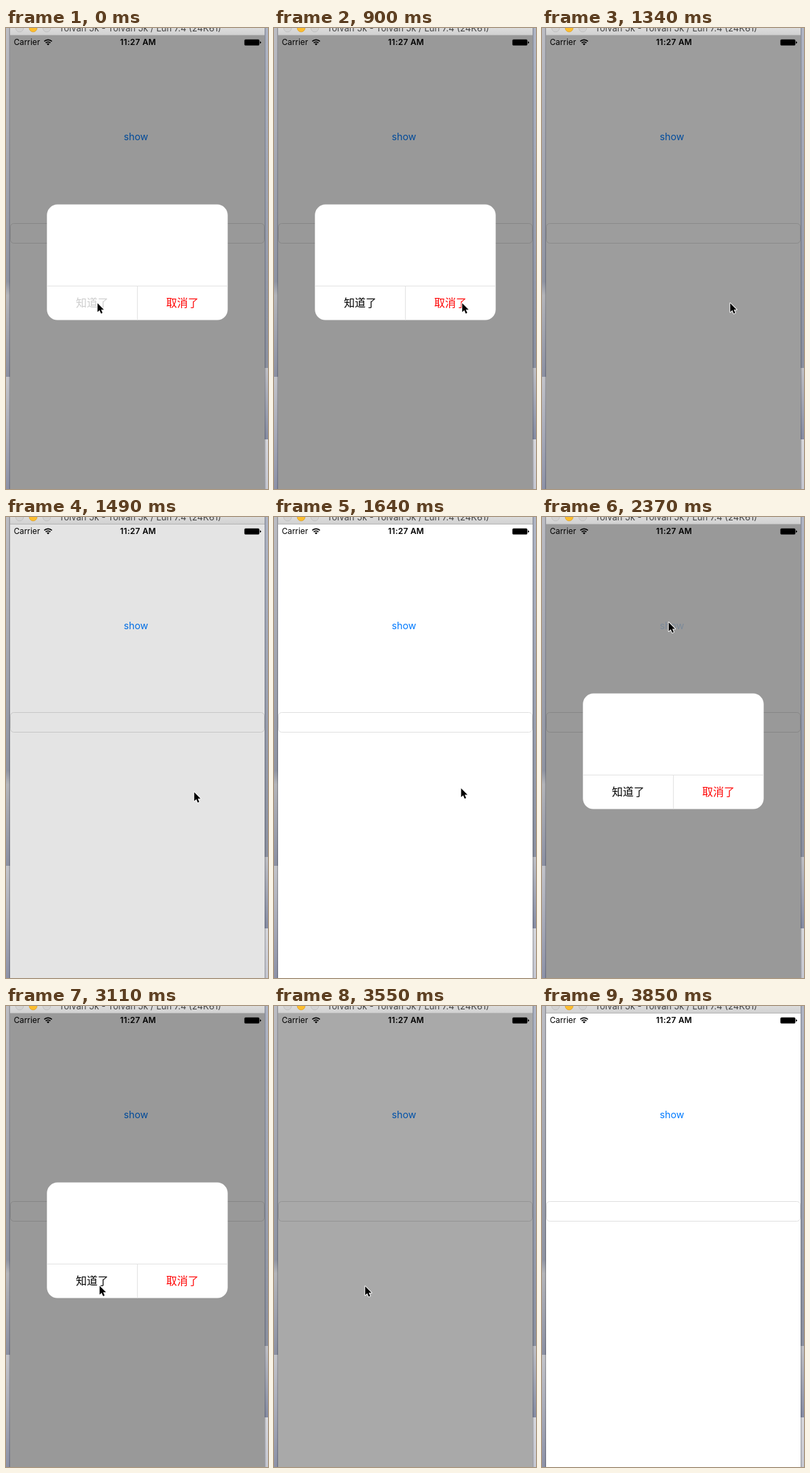
Recreate the animation shown at these times as an HTML page. Size 386x678 px, loop 4.66 s.

```html
<!DOCTYPE html>
<html lang="zh-CN">
<head>
<meta charset="utf-8">
<title>Alert demo</title>
<style>
  html, body { margin: 0; width: 100%; height: 100%; overflow: hidden; }
  svg { display: block; width: 386px; height: 678px; font-family: Inter, Roboto, sans-serif; }
  .cjk { font: 16px "Noto Sans CJK SC", "Noto Sans CJK", sans-serif; text-anchor: middle; }
  .mid { text-anchor: middle; }
</style>
</head>
<body>
<svg viewBox="0 0 386 678">
  <defs>
    <linearGradient id="left" gradientUnits="userSpaceOnUse" x1="0" y1="0" x2="0" y2="678">
      <stop offset="0" stop-color="#bcbdc4"/>
      <stop offset=".55" stop-color="#8f94a3"/>
      <stop offset=".58" stop-color="#b4b5ba"/>
      <stop offset=".757" stop-color="#8b90a3"/>
      <stop offset=".757" stop-color="#c3c4ca"/>
      <stop offset="1" stop-color="#8d92a8"/>
    </linearGradient>
    <linearGradient id="right" gradientUnits="userSpaceOnUse" x1="0" y1="0" x2="0" y2="678">
      <stop offset="0" stop-color="#b0b6c6"/>
      <stop offset=".738" stop-color="#8a90a0"/>
      <stop offset=".738" stop-color="#bfc0c6"/>
      <stop offset=".892" stop-color="#858ca4"/>
      <stop offset=".892" stop-color="#d6d7dd"/>
      <stop offset="1" stop-color="#c6c8d2"/>
    </linearGradient>
    <linearGradient id="bar" x2="0" y2="1">
      <stop offset="0" stop-color="#dcdcdc"/>
      <stop offset="1" stop-color="#d0d0d0"/>
    </linearGradient>
  </defs>

  <!-- desktop and window frame -->
  <rect width="6" height="678" fill="url(#left)"/>
  <rect x="381" width="5" height="678" fill="url(#right)"/>
  <path d="M5.5 0V678M381.5 0V678" stroke="#000" stroke-opacity=".22"/>
  <path d="M4.5 0V678M382.5 0V678" stroke="#000" stroke-opacity=".08"/>
  <rect x="6" width="375" height="11" fill="url(#bar)"/>
  <path d="M6 10.5H381" stroke="#b4b4b4"/>
  <g stroke-width=".8">
    <circle cx="20" r="5.8" fill="#d2d2d2" stroke="#bcbcbc"/>
    <circle cx="40" r="5.8" fill="#fcbd2e" stroke="#dfa023"/>
    <circle cx="60" r="5.8" fill="#d2d2d2" stroke="#bcbcbc"/>
  </g>
  <text class="mid" x="197.5" y="5" font-size="13" fill="#444">Tolvan 5k - Tolvan 5k / Lun 7.4 (24K61)</text>

  <!-- app screen -->
  <rect x="6" y="11" width="375" height="667" fill="#fff"/>
  <text id="show" class="mid" x="191.5" y="165" font-size="14.3" fill="#007aff">show</text>
  <rect x="6.5" y="287.5" width="374" height="29" rx="5" fill="none" stroke="#dfdfdf"/>
  <rect id="dim" x="6" y="11" width="375" height="667"/>

  <!-- status bar -->
  <text x="11.5" y="25.3" font-size="11.8">Carrier</text>
  <g fill="none" stroke="#000" stroke-width="1.7">
    <path d="M56.4 19.6A8 8 0 0 1 67.6 19.6"/>
    <path d="M58.5 22A5 5 0 0 1 65.5 22"/>
  </g>
  <path d="M62 25.6L60 23.5A3 3 0 0 1 64 23.5Z"/>
  <text class="mid" x="194.6" y="25.3" font-size="12" font-weight="600" letter-spacing=".25">11:27 AM</text>
  <rect x="351.4" y="16.9" width="21.7" height="8.7" rx="1.6" stroke="#000" stroke-opacity=".5" stroke-width=".7"/>
  <path d="M374 19.5Q375.8 20 375.8 21.2T374 23Z"/>

  <!-- alert -->
  <g id="alert">
    <rect x="60.3" y="259.6" width="266.3" height="170" rx="15.5" fill="#fff"/>
    <path d="M60.5 379.5H326.5M193.5 379.5V429.5" stroke="#e2e2e2"/>
    <text id="ok" class="cjk" x="127" y="410.3">知道了</text>
    <text class="cjk" x="260" y="410.3" fill="#f00">取消了</text>
  </g>

  <g id="cursor">
    <path d="M0 0V15L3.5 11.8L6 17.4L8.5 16.3L6.1 10.9H10.8Z" transform="translate(.8 .8) scale(.87)"
      stroke="#fff" stroke-width="2.2" stroke-linejoin="round" paint-order="stroke"/>
  </g>
</svg>
<script>
const LOOP = 4660, TICK = 147.9;
const CANCEL = 9, OPEN = 16, PRESS = 22, CLOSE = 24, LEAVE = 26; // in ticks
const HOME = [134, 404];

// Each sweep decays toward its end along a curve bent by "via".
const sweeps = [
  { at: 1.7, drag: .1, via: [200, 442], to: [276.5, 404] },
  { at: 10.99, drag: .38, via: [190, 105], to: [185.8, 155] },
  { at: 17.9, drag: .34, via: [185, 405], to: [133.5, 411.5] },
  { at: CLOSE, drag: .5, via: [134, 416], to: [134, 424] }
];

const el = id => document.getElementById(id);
const set = (id, name, value) => el(id).setAttribute(name, value);
const smooth = u => {
  u = Math.min(1, Math.max(0, u));
  return u * u * (3 - 2 * u);
};
const release = (n, start, length) => .2 + .8 * smooth((n - start) / length);
const bend = (a, b, c, s) => a * (1 - s) ** 2 + 2 * b * s * (1 - s) + c * s * s;

function pointer(n) {
  let from = HOME, pos = HOME;
  for (const { at, drag, via, to } of sweeps) {
    if (n < at) break;
    const s = 1 - drag ** (n - at);
    pos = from.map((v, i) => bend(v, via[i], to[i], s));
    from = to;
  }
  return pos;
}

function draw(ms) {
  const n = Math.floor(Math.max(0, ms) % LOOP / TICK);
  const fadeStart = n < OPEN ? CANCEL - .23 : CLOSE - .46;
  const open = n < CANCEL || (n >= OPEN && n < CLOSE);

  set("dim", "fill-opacity", .4 * (1 - smooth((n - fadeStart) / 1.85)));
  set("alert", "visibility", open ? "visible" : "hidden");
  set("ok", "fill-opacity", n < PRESS ? release(n, 2.2, 3.6) : .2);
  set("show", "fill-opacity", n < OPEN ? 1 : release(n, OPEN, 2));
  set("cursor", "transform", `translate(${pointer(n)})`);
  set("cursor", "visibility", n < LEAVE ? "visible" : "hidden");
}

const start = performance.now();
function tick() {
  draw(performance.now() - start);
  requestAnimationFrame(tick);
}
tick();
</script>
</body>
</html>
```
